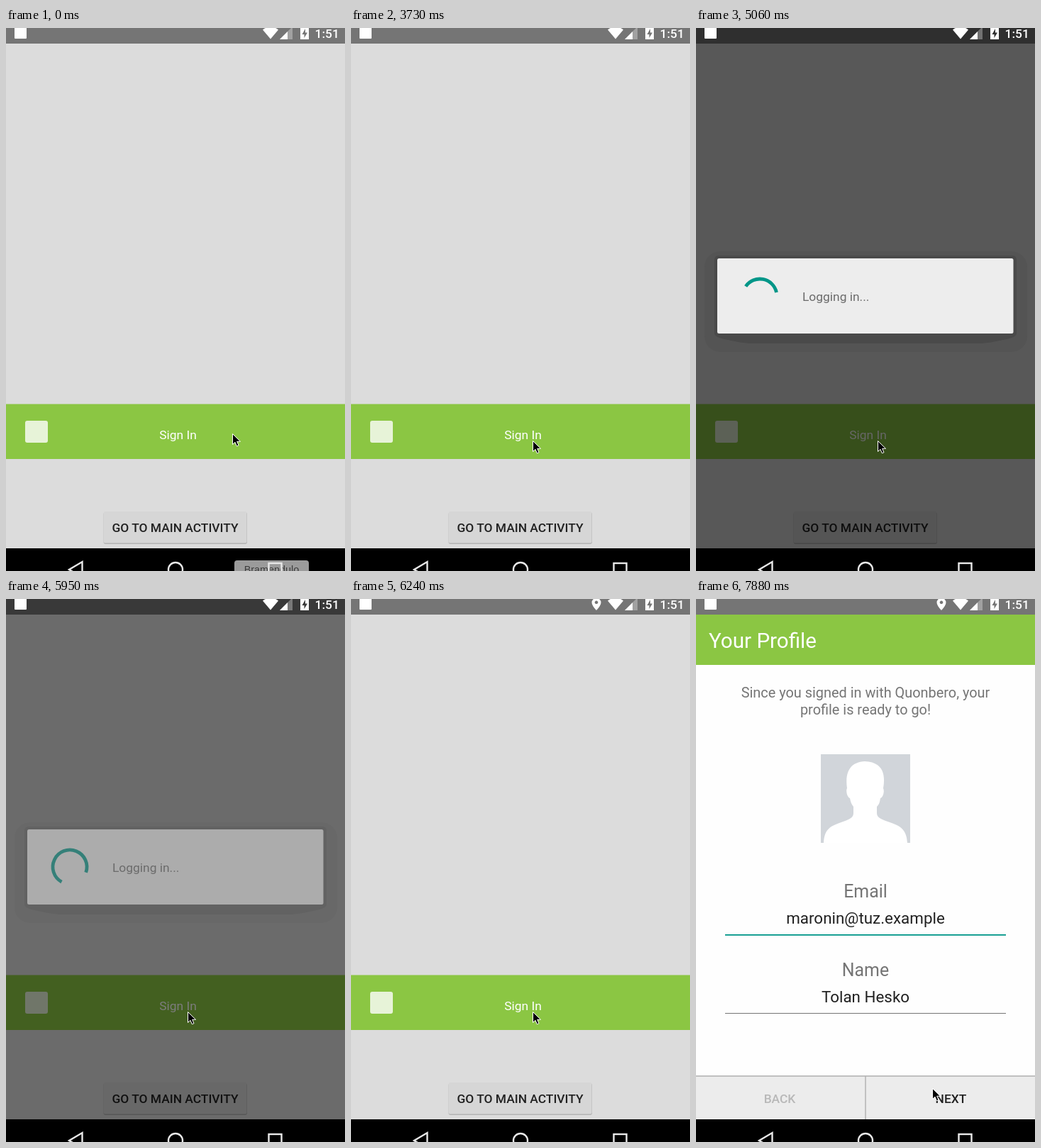
These frames come from a looping animation (478x766 px, 8 s). An HTML page:

```html
<!DOCTYPE html>
<html lang="en">
<head>
<meta charset="utf-8">
<title>Sign in flow</title>
<style>
  html, body { margin: 0; width: 100%; height: 100%; overflow: hidden; background: #000; }
  svg { display: block; width: 478px; height: 766px; }
  text { font: 17.4px Roboto, sans-serif; }
  .mid { text-anchor: middle; }
  .bold { font-weight: 500; }
  .label { font-size: 24.9px; fill: #757575; }
  .value { font-size: 22.4px; fill: #212121; }
  .note { font-size: 19.9px; fill: #757575; }
</style>
</head>
<body>
<svg viewBox="0 0 478 766">
  <rect width="478" height="766"/>

  <g id="login">
    <rect width="478" height="734" fill="#dcdcdc"/>
    <rect width="478" height="22" fill="#757575"/>
    <rect y="530.5" width="478" height="77.5" fill="#8bc643"/>
    <rect x="27" y="554" width="32" height="31" rx="3" fill="#e7f3d8"/>
    <text class="mid" x="242.5" y="579.5" fill="#fff">Sign In</text>
    <rect x="137.5" y="683" width="202.5" height="45" rx="3" fill="#b4b4b4"/>
    <rect x="137.5" y="682" width="202" height="44.5" rx="2.5" fill="#d6d6d6"/>
    <text class="mid bold" x="238.5" y="711" fill="#212121">GO TO MAIN ACTIVITY</text>
  </g>

  <rect id="dim" width="478" height="734"/>

  <g id="dialog">
    <rect x="12" y="315" width="455" height="142" rx="22" opacity=".05"/>
    <path d="M26 327q0-6 6-6H446q6 0 6 6V431Q452 436 440 438.500Q412 445 400 445H78Q66 445 38 438.500Q26 436 26 431Z" opacity=".12"/>
    <rect x="30" y="325" width="417.500" height="106" rx="2.500" fill="#ededed"/>
    <path id="arc" fill="none" stroke="#009688" stroke-width="4.800"/>
    <text x="150" y="385" fill="#6b6b6b">Logging in...</text>
  </g>

  <g id="profile">
    <rect width="478" height="734" fill="#fefefe"/>
    <rect width="478" height="22" fill="#757575"/>
    <rect y="22" width="478" height="71" fill="#8bc643"/>
    <text x="18" y="69" fill="#fff" style="font-size:29.6px">Your Profile</text>
    <text class="mid note" x="239" y="139">Since you signed in with Quonbero, your</text>
    <text class="mid note" x="239" y="163">profile is ready to go!</text>
    <g id="avatar">
      <rect x="176" y="219" width="126" height="125" fill="#d1d5da"/>
      <path fill="#fff" d="M180 344C181 326 188 321 202 316C216 311 222 309 222 302V293C219 289 218 286 217 281C213 280 211 270 213 267C210 246 216 230 238 229C261 230 268 244 264 267C266 271 264 280 260 281C259 287 258 290 255 293V302C255 309 262 311 276 316C290 321 297 327 298 344Z"/>
    </g>
    <g id="fields">
      <text class="mid label" x="239" y="421">Email</text>
      <text class="mid value" x="239" y="458">maronin@tuz.example</text>
      <rect x="41" y="473" width="396" height="1.800" fill="#009688"/>
      <text class="mid label" x="239" y="532">Name</text>
      <text class="mid value" x="239" y="569">Tolan Hesko</text>
      <rect x="41" y="584" width="396" height="1" fill="#757575"/>
    </g>
    <rect y="672" width="478" height="62" fill="#ececec"/>
    <path d="M0 673H478M239 673V734" stroke="#b2b2b2" stroke-width="1.500"/>
    <text class="mid bold" x="118" y="711" fill="#b8b8b8">BACK</text>
    <text class="mid bold" x="359.500" y="711" fill="#212121">NEXT</text>
  </g>

  <g fill="#fff">
    <rect x="12" y="-2" width="17" height="17" rx="1"/>
    <path id="pin" fill-rule="evenodd" d="M346 16Q339.500 9 339.500 5A6.500 6.500 0 0 1 352.500 5Q352.500 9 346 16ZM346 2.500a2.300 2.300 0 1 0 .01 0Z"/>
    <path d="M362 2.500Q373-6 384 2.500L373 15.500Z"/>
    <path d="M386 16L404-2V16Z" opacity=".32"/>
    <path d="M386 16L397 5V16Z"/>
    <path fill-rule="evenodd" d="M415 0H418V-3H424V0H427V16H415ZM422 1L417.500 9H420.500V14L425 6.500H422Z"/>
    <text class="bold" x="435.500" y="14">1:51</text>
  </g>

  <g id="tip">
    <rect x="322" y="751" width="105" height="24" rx="4" fill="#9b9b9b"/>
    <text class="mid" x="374.500" y="768.500" fill="#3c3c3c" style="font:14.4px 'Liberation Sans',sans-serif">Bramendulo</text>
  </g>
  <g fill="none" stroke="#e8e8e8" stroke-width="2.400">
    <path d="M107.500 753V775L89 764Z"/>
    <circle cx="239" cy="764" r="10"/>
    <rect x="370.500" y="755" width="18" height="18"/>
  </g>

  <path id="cursor" d="M.5.500V15.500L4 12.300L6.300 17.800L9 16.700L6.700 11.300H11.500Z" stroke="#fff"/>
</svg>
<script>
const LOOP = 8000;
const $ = id => document.getElementById(id);
const show = (id, on) => $(id).setAttribute('visibility', on ? 'visible' : 'hidden');
const fade = (id, v) => $(id).setAttribute('opacity', v);
const move = (id, x, y) => $(id).setAttribute('transform', `translate(${x} ${y})`);

// Rows of [ms, values...]; each row holds until the next.
const at = (rows, t) => rows.findLast(r => r[0] <= t);

// Evenly timed cursor stops between two points, eased at both ends.
const glide = (t0, t1, n, [x0, y0], [x1, y1]) => Array.from({ length: n }, (_, i) => {
  const k = (i + 1) / n, e = k * k * (3 - 2 * k);
  return [Math.floor(t0 + (t1 - t0) * i / (n - 1)), x0 + (x1 - x0) * e, y0 + (y1 - y0) * e];
});

const cursor = [
  [0, 319, 572], [2100, 285, 640], [2250, 278, 651], [2550, 278, 634], [2700, 278, 617],
  ...glide(2990, 3730, 6, [278, 617], [256, 582]),
  ...glide(6990, 7440, 4, [256, 582], [332, 682]),
  [7740, 332, 686], [7880, 333, 690]
];

// ms, dim, dialog opacity
const overlay = [
  [0, 0, 0], [4330, .2, .3], [4480, .5, .8], [4630, .6, 1],
  [5950, .514, .5], [6100, .25, 0], [6240, 0, 0]
];

// ms, profile opacity, offset
const page = [[0, 0, 0], [6540, .75, 16], [6690, 1, 0]];

// cubic-bezier(.4, 0, .2, 1)
function ease(x) {
  let lo = 0, hi = 1;
  for (let i = 0; i < 20; i++) {
    const s = (lo + hi) / 2, r = 1 - s;
    if (1.2 * s * r * r + .6 * s * s * r + s * s * s < x) lo = s; else hi = s;
  }
  return lo * lo * (3 - 2 * lo);
}

function arc(t) {
  const dt = t - 5065;
  const turn = dt / 1250 + 1.676, p = turn % 1;
  const start = .75 * ease(Math.max(0, p * 2 - 1));
  const end = .75 * ease(Math.min(1, p * 2));
  const base = 17 + .0764 * dt + 90 * p;
  const point = f => {
    const a = (base + 360 * f) * Math.PI / 180;
    return `${90 + 24 * Math.cos(a)} ${378 + 24 * Math.sin(a)}`;
  };
  const far = Math.max(end, start + .01);
  return `M${point(start)}A24 24 0 ${far - start > .5 ? 1 : 0} 1 ${point(far)}`;
}

function render(t) {
  const [, x, y] = at(cursor, t);
  const [, dim, dialog] = at(overlay, t);
  const [, alpha, drop] = at(page, t);
  move('cursor', x, y);
  fade('dim', dim);
  fade('dialog', dialog);
  fade('profile', alpha);
  move('profile', 0, drop);
  if (dialog) $('arc').setAttribute('d', arc(4330 + 147 * Math.floor((t - 4320) / 147)));
  const loaded = t >= 6990;
  fade('avatar', loaded ? 1 : 0);
  move('fields', 0, loaded ? 0 : -126);
  show('pin', t >= 6240);
  show('tip', t < 150);
}

let begin;
function tick(now) {
  begin ??= now;
  render((now - begin) % LOOP);
  requestAnimationFrame(tick);
}
render(0);
requestAnimationFrame(tick);
</script>
</body>
</html>
```
